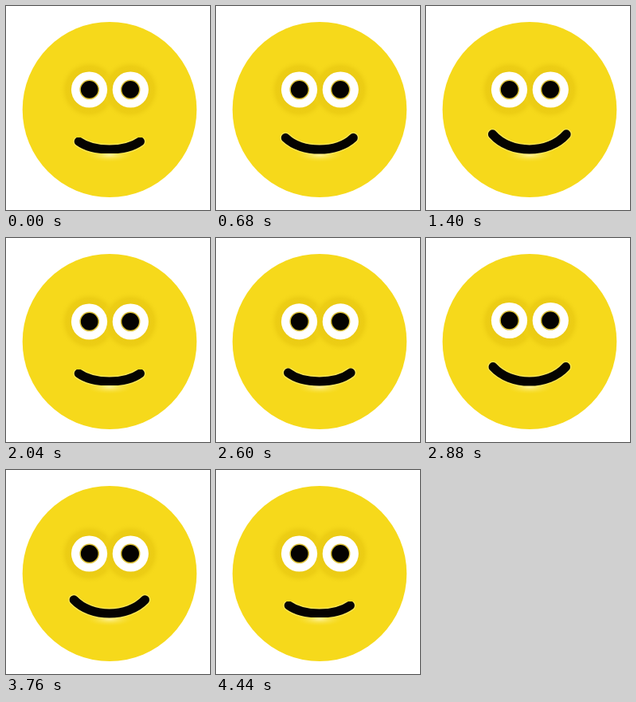
An HTML page that plays this animation: 256x256 px, repeating every 4.48 s.

```html
<!DOCTYPE html>
<html lang="en">
<head>
<meta charset="utf-8">
<title>Smile</title>
<style>
html, body { margin: 0; width: 100%; height: 100%; overflow: hidden; background: #fff; }
svg { display: block; width: 100vw; height: 100vh; }
</style>
</head>
<body>
<svg viewBox="0 0 256 256">
  <defs>
    <radialGradient id="shade">
      <stop offset=".6" stop-color="#ebcb14"/>
      <stop offset=".78" stop-color="#eccd14" stop-opacity=".9"/>
      <stop offset="1" stop-color="#f5d91b" stop-opacity="0"/>
    </radialGradient>
    <radialGradient id="glow">
      <stop offset="0" stop-color="#fff3a0"/>
      <stop offset="1" stop-color="#f8df30" stop-opacity="0"/>
    </radialGradient>
    <filter id="soft" x="-20%" y="-50%" width="140%" height="200%">
      <feGaussianBlur stdDeviation=".6"/>
    </filter>
  </defs>
  <ellipse cx="130" cy="130" rx="109.3" ry="110" fill="#f6d91b"/>
  <circle cx="104.5" cy="105" r="38" fill="url(#shade)"/>
  <circle cx="156.3" cy="105" r="38" fill="url(#shade)"/>
  <g id="eyes" filter="url(#soft)">
    <g fill="#fff">
      <circle cx="104.5" cy="105" r="22.6"/>
      <circle cx="156.3" cy="105" r="22.6"/>
    </g>
    <g fill="#050301" stroke="#dcc136" stroke-width="1.5">
      <circle cx="104.7" cy="104.9" r="11.6"/>
      <circle cx="156.1" cy="104.9" r="11.6"/>
    </g>
  </g>
  <ellipse cx="130" cy="187" rx="30" ry="9" fill="url(#glow)"/>
  <g fill="none" stroke-linecap="round" filter="url(#soft)">
    <path class="mouth" stroke="#fff07a" stroke-opacity=".6" stroke-width="14"/>
    <path class="mouth" stroke="#050301" stroke-width="11.2"/>
  </g>
</svg>
<script>
const LOOP = 4480, STEP = 40;
const eyes = document.getElementById('eyes');
const mouths = document.querySelectorAll('.mouth');

// 0 to 1 between two times, eased at both ends
function ease(t, from, to) {
  const u = Math.min(1, Math.max(0, (t - from) / (to - from)));
  return (1 - Math.cos(Math.PI * u)) / 2;
}

function smileAt(t) {
  return ease(t, 180, 1240) - ease(t, 1240, 2040)
       + ease(t, 2500, 3020) - ease(t, 3440, 4320);
}

function liftAt(t) {
  return ease(t, 720, 1000) - ease(t, 1000, 1320)
       + ease(t, 2540, 2880) - ease(t, 3120, 3640);
}

function draw(t) {
  const s = smileAt(t);
  const mid = 129.8;
  const half = 38.5 + 8.6 * s;
  const y = 170 - 10 * s;
  const low = (180 - y / 4) / 0.75;
  const inner = half * 0.52;
  const d = `M${mid - half} ${y}C${mid - inner} ${low} ${mid + inner} ${low} ${mid + half} ${y}`;
  mouths.forEach(m => m.setAttribute('d', d));
  eyes.setAttribute('transform', `translate(0 ${-1.5 * liftAt(t)})`);
}

function tick() {
  const t = performance.now() % LOOP;
  draw(Math.floor(t / STEP) * STEP);
  requestAnimationFrame(tick);
}
tick();
</script>
</body>
</html>
```
